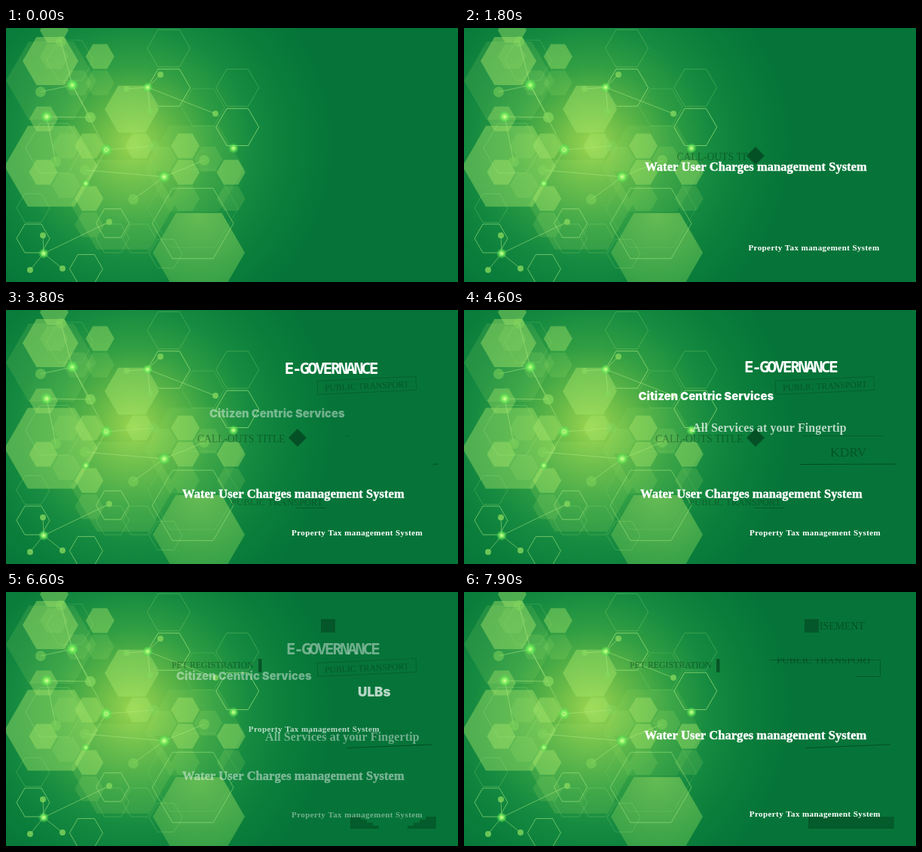
These frames come from a looping animation (600x338 px, 8000 ms). An HTML page with a canvas:

```html
<!DOCTYPE html>
<html lang="en">
<head>
<meta charset="utf-8">
<title>E-Governance</title>
<style>
html, body { margin: 0; width: 100%; height: 100%; overflow: hidden; background: #067438; }
canvas { display: block; }
</style>
</head>
<body>
<canvas id="stage" width="600" height="338"></canvas>
<script>
const W = 600, H = 338, LOOP = 8000, CYCLE = 6000;
const ctx = document.getElementById('stage').getContext('2d');
const ramp = (a, b, t) => Math.min(1, Math.max(0, (t - a) / (b - a)));
const ease = (a, b, t) => { const p = ramp(a, b, t); return p * p * (3 - 2 * p); };
const mix = (a, b, p) => a + (b - a) * p;

// ---- Static backdrop ----
function makeBackdrop() {
  const c = document.createElement('canvas');
  c.width = W; c.height = H;
  const g = c.getContext('2d');

  // Evenly spaced colour stops around a point.
  const radial = (x, y, r, colors) => {
    const grad = g.createRadialGradient(x, y, 0, x, y, r);
    colors.forEach((color, i) => grad.addColorStop(i / (colors.length - 1), color));
    return grad;
  };
  const hexPath = (x, y, r) => {
    g.beginPath();
    for (let a = 0; a < 6; a++) g.lineTo(x + r * Math.cos(a * Math.PI / 3), y + r * Math.sin(a * Math.PI / 3));
    g.closePath();
  };
  const fillHex = (x, y, r, alpha) => {
    hexPath(x, y, r);
    g.fillStyle = `rgba(165,228,105,${alpha})`;
    g.fill();
  };
  const lineHex = (x, y, r, alpha) => {
    hexPath(x, y, r);
    g.strokeStyle = `rgba(165,232,125,${alpha})`;
    g.stroke();
  };
  // Cells of a honeycomb, as column and half-row steps from its origin.
  const comb = (x, y, r, draw, alpha, ...cells) =>
    cells.forEach(([i, j]) => draw(x + i * r * 1.6, y + j * r * .92, r, alpha));

  g.fillStyle = radial(170, 155, 265, ['#9cd650', '#62b847', '#309e43', '#158a40', '#0a7d3b', '#067438']);
  g.fillRect(0, 0, W, H);
  g.lineWidth = 1;

  fillHex(60, 70, 60, .14);
  fillHex(250, 187, 66, .1);
  fillHex(155, 235, 69, .16);
  fillHex(60, 184, 62, .42);
  fillHex(59, 44, 37, .45);
  fillHex(167, 108, 36, .45);
  fillHex(50, 121, 19, .38);
  comb(64, 38, 19, fillHex, .42, [0, -2], [2, 0]);
  comb(64, 38, 19, fillHex, .16, [0, 0], [1, 2], [2, 2]);
  comb(238, 157, 19, fillHex, .42, [-4.2, 0], [-2, 0], [0, 0], [0, 2], [2, 2], [-4.2, 4], [-6.2, 2]);
  comb(238, 157, 19, fillHex, .16, [-5.2, 0], [-1, 1], [1, 1], [0, 4], [2, 4], [-5.2, 3], [-4.2, 6]);

  hexPath(256, 299, 61);
  g.fillStyle = radial(256, 246, 100, ['#66bc54', '#36a047']);
  g.fill();

  // Outlined combs, brighter at the lower end of each even column.
  for (let i = 0; i < 3; i++)
    for (let d = 0; d < 3; d += 2)
      comb(216, 27, 28.5, lineHex, i % 2 ? .1 * d : .28 + .2 * d, [i, i + d]);
  comb(36, 280, 22, lineHex, .6, [0, 0], [2, 2], [3, -1]);
  comb(36, 280, 22, lineHex, .25, [0, -2], [3, 0], [4, 0], [5, 1]);
  lineHex(248, 260, 54, .55);
  lineHex(248, 240, 60, .15);
  lineHex(64, 160, 38, .3);
  lineHex(85, 43, 31, .22);

  // A glowing hub linked to round dots.
  const star = (x, y, dot, ...ends) => {
    g.strokeStyle = 'rgba(175,235,130,.5)';
    ends.forEach(([a, b]) => {
      g.beginPath();
      g.moveTo(x, y);
      g.lineTo(a, b);
      g.stroke();
      g.beginPath();
      g.arc(a, b, dot, 0, 7);
      g.fillStyle = `rgba(130,214,92,${dot < 5 ? .8 : .5})`;
      g.fill();
    });
    const r = dot / 2 + 5;
    g.fillStyle = radial(x, y, r, ['#dcffa8', 'rgba(150,248,105,.9)', 'rgba(95,232,85,.55)', 'rgba(80,220,80,0)']);
    g.fillRect(x - r, y - r, 2 * r, 2 * r);
  };
  star(133, 162, 7, [196, 157]);
  star(106, 207, 1, [133, 162]);
  star(88, 76, 7, [46, 85], [73, 18], [112, 119]);
  star(88, 76, 1, [133, 162]);
  star(54, 118, 7, [112, 119], [66, 178]);
  star(210, 198, 7, [105, 189], [263, 176], [169, 228]);
  star(188, 79, 4, [160, 81], [205, 62], [191, 111], [278, 114]);
  star(50, 300, 4, [49, 276], [137, 258], [75, 320], [32, 322]);
  star(302, 160, 4);
  return c;
}

// ---- Dark underlay lettering ----
const shade = alpha => `rgba(0,38,18,${alpha})`;

function ink(s, x, y, size, alpha) {
  ctx.font = `${size}px "Liberation Serif", serif`;
  ctx.fillStyle = shade(alpha);
  ctx.fillText(s, x, y);
}

function line(alpha, ...points) {
  ctx.strokeStyle = shade(alpha);
  ctx.beginPath();
  points.forEach(([x, y]) => ctx.lineTo(x, y));
  ctx.stroke();
}

function block(alpha, x, y, w, h) {
  ctx.fillStyle = shade(alpha);
  ctx.fillRect(x, y, w, h);
}

function clipped(x, y, w, h, draw) {
  ctx.save();
  ctx.beginPath();
  ctx.rect(x, y, w, h);
  ctx.clip();
  draw();
  ctx.restore();
}

function turned(x, y, angle, draw) {
  ctx.save();
  ctx.translate(x, y);
  ctx.rotate(angle);
  draw();
  ctx.restore();
}

function drawCallout(t) {
  const x = 380 - 126 * ease(900, 2200, t) + 126 * ease(5100, 6200, t);
  clipped(240, 155, 137, 35, () => ink('CALL-OUTS TITLE', x, 176, 13.6, .4));
  const alpha = ramp(1200, 1600, t) * (1 - ramp(4800, 6300, t));
  turned(387, 170, Math.PI / 4, () => block(.5 * alpha, -8.5, -8.5, 17, 17));
}

function drawTransport(t) {
  const alpha = .35 * ramp(2500, 2900, t) * (1 - ramp(5600, 6400, t));
  ink('PUBLIC TRANSPORT', 299, 260, 12.7, alpha);
  line(alpha, [385, 263.5], [425, 263.5]);
  if (t < 2700) return;
  if (t >= 3400 && t < 7100) {
    turned(479, 100, -.045, () => {
      ctx.strokeStyle = shade(.25);
      ctx.strokeRect(-65.5, -8.5, 131, 18);
      ink('PUBLIC TRANSPORT', -56, 5, 11.7, .38);
    });
  } else {
    clipped(400, 88, 155, 7, () => ink('PUBLIC TRANSPORT', 415, 95, 13.2, .4));
    line(.35, [405, 90.5], [552.5, 90.5], [552.5, 112.5], [520, 112.5]);
  }
}

function drawPanel(t) {
  const grow = ease(3700, 4400, t), tilt = ease(4700, 5400, t);
  if (!grow) return;
  ink('KDRV', 486, 195, 17.6, grow * mix(.4, .15, tilt));
  line(.5, [mix(574 - 128 * grow, 453, tilt), 205.5 + 2 * tilt], [mix(574, 566, tilt), 205 - 2 * tilt]);
  line(.25 * (1 - tilt), [450, 167.5], [450 + 106 * grow, 167.5]);
}

function drawRegistration(t) {
  if (t < 5200) return;
  const x = mix(206, 335, ease(5400, 6300, t));
  clipped(210, 85, Math.max(0, x - 211), 25, () => ink('PET REGISTRATION', 220, 101, 11.8, .45));
  block(.5, x, 89, 4.5, 18);
}

function drawSquare(t) {
  const x = mix(418, 452, ease(6600, 7700, t));
  block(.36 * ramp(6000, 6400, t), x, 36, 19, 18);
  clipped(x + 19, 30, 70, 30, () => ink('ISEMENT', 472, 50, 13.8, .45 * ramp(6900, 7300, t)));
}

// Two staircases that grow together into one bar.
function drawSteps(t) {
  const alpha = .32 * ramp(6000, 6400, t), grow = 57 * ease(6600, 7500, t);
  for (let i = 0; i < 4; i++) {
    const w = Math.min(57, 14 + i * 8 + grow);
    block(alpha, 457, 299 + i * 4, w, 4);
    block(alpha, 571 - w, 299 + i * 4, w, 4);
  }
}

// ---- White titles: start and end pose, and the span of the move ----
const serif = px => `bold ${px}px "Liberation Serif", serif`;
const sans = px => `900 ${px}px Inter, sans-serif`;
const titles = [
  { s: 'Property Tax management System', face: serif(11.1), gap: .37, from: [319, 181], to: [379, 299.5], move: [400, 1950] },
  { s: 'Water User Charges management System', face: serif(16.5), gap: .04, heavy: .4, from: [241, 182.5], to: [234, 250], move: [1500, 2900] },
  { s: 'E-GOVERNANCE', face: 'bold 21px "Noto Sans Mono", monospace', gap: -2.4, from: [338, 122], to: [372, 83], move: [2700, 4000] },
  { s: 'Citizen Centric Services', face: sans(14.8), from: [271, 144], to: [226, 117], move: [3700, 4850] },
  { s: 'All Services at your Fingertip', face: serif(16), gap: .1, from: [301, 160], to: [344, 198], move: [4400, 5900] },
  { s: 'ULBs', face: sans(17.2), from: [378, 150], to: [467, 139], move: [5200, 6600], leave: 6400 }
];

function drawTitle({ s, face, gap = 0, heavy = 0, from, to, move, leave = 6200 }, t) {
  const alpha = ramp(move[0] - 50, move[0] + 300, t) * (1 - ramp(leave, leave + 700, t));
  if (!alpha) return;
  const p = ease(...move, t), x = mix(from[0], to[0], p), y = mix(from[1], to[1], p);
  ctx.save();
  ctx.globalAlpha = alpha;
  ctx.fillStyle = ctx.strokeStyle = '#fff';
  ctx.font = face;
  ctx.letterSpacing = gap + 'px';
  ctx.fillText(s, x, y);
  if (heavy) {
    ctx.lineWidth = heavy;
    ctx.strokeText(s, x, y);
  }
  ctx.restore();
}

const backdrop = makeBackdrop();
const underlays = [drawCallout, drawTransport, drawPanel, drawRegistration, drawSquare, drawSteps];

function frame(now) {
  const t = Math.floor(now % LOOP / 100) * 100;
  ctx.drawImage(backdrop, 0, 0);
  ctx.lineWidth = 1;
  underlays.forEach(draw => draw(t));
  titles.forEach(title => { drawTitle(title, t); drawTitle(title, t - CYCLE); });
  requestAnimationFrame(frame);
}
requestAnimationFrame(frame);
</script>
</body>
</html>
```
